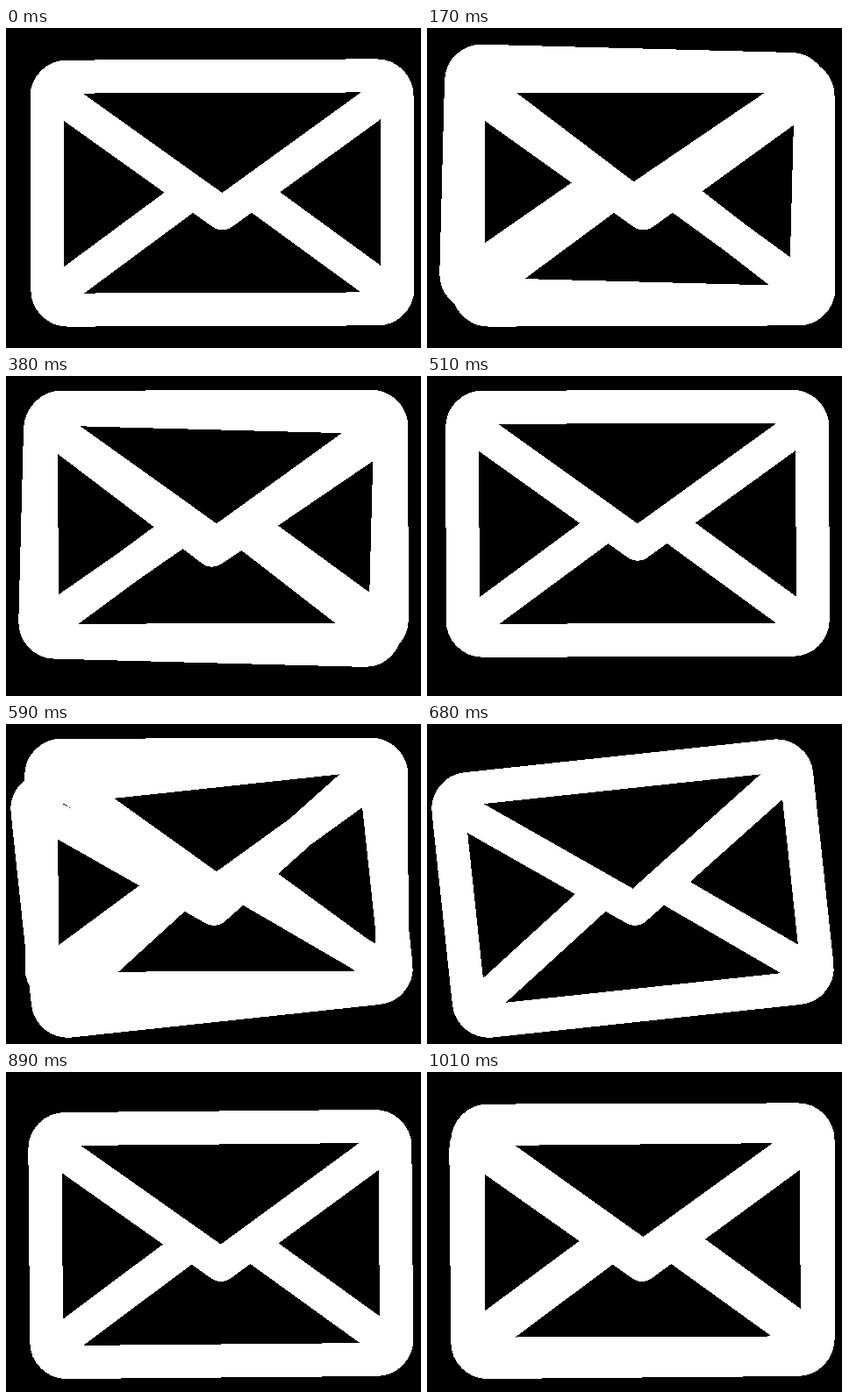
Animation, 473 px wide and 365 px high, one loop 1.05 s. Source, as an HTML page:

```html
<!DOCTYPE html>
<html lang="en">
<head>
<meta charset="utf-8">
<title>Shaking envelope</title>
<style>
  html, body { margin: 0; width: 100%; height: 100%; overflow: hidden; background: #000; }
  svg { display: block; width: 473px; height: 365px; }
</style>
</head>
<body>
<svg viewBox="0 0 473 365" shape-rendering="crispEdges">
  <defs>
    <g id="envelope" fill="none" stroke="#fff" stroke-width="38">
      <rect x="-199.5" y="-133" width="399" height="266" rx="23"/>
      <path d="M-199.5-120 0 23.4 199.5-120" stroke-linejoin="round"/>
      <path d="M-199.5 121.2-40 4M199.5 121.2 40 4"/>
    </g>
  </defs>
  <use id="now" href="#envelope"/>
  <use id="next" href="#envelope"/>
</svg>
<script>
  const HOLD = 210, BLEND_AT = 170;

  // Key poses of the shake
  const poses = [
    { x: 246.4, y: 188, angle: -0.2 },
    { x: 235.6, y: 175.3, angle: 1.5 },
    { x: 240, y: 168.3, angle: -0.15 },
    { x: 234.5, y: 187.6, angle: -6.1 },
    { x: 244.8, y: 196.5, angle: -0.5 }
  ];
  const now = document.getElementById('now');
  const next = document.getElementById('next');

  function place(el, index) {
    const { x, y, angle } = poses[index % poses.length];
    el.setAttribute('transform', `translate(${x} ${y}) rotate(${angle})`);
  }

  // The pose jumps; just before each jump the old and new poses overlap
  function draw(time) {
    const t = time % (HOLD * poses.length);
    const index = Math.floor(t / HOLD);
    place(now, index);
    place(next, t % HOLD < BLEND_AT ? index : index + 1);
  }

  const start = performance.now();

  function tick() {
    draw(performance.now() - start);
    requestAnimationFrame(tick);
  }

  tick();
</script>
</body>
</html>
```
